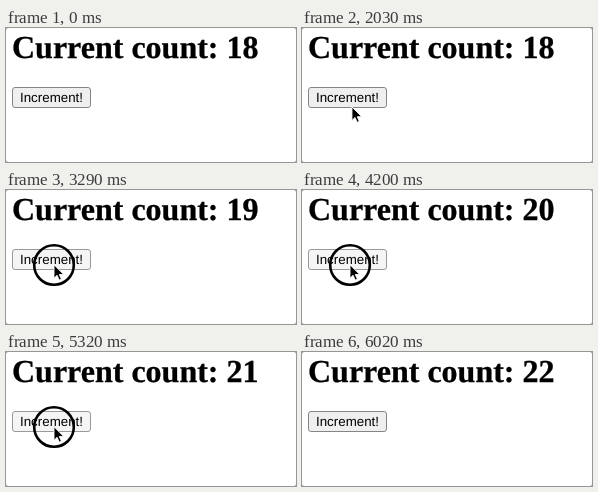
An HTML page for the animation above (6580 ms loop, 290 by 134 pixels).

```html
<!DOCTYPE html>
<html lang="en">
<head>
<meta charset="utf-8">
<title>Counter</title>
<style>
  html, body { margin: 0; width: 100%; height: 100%; overflow: hidden; background: #fff; }
  svg { display: block; width: 290px; height: 134px; }
  text { text-rendering: geometricPrecision; white-space: pre; }
  #heading {
    font: bold 32px "Liberation Serif", "Times New Roman", serif;
    stroke: #000; stroke-width: .3px;
  }
  #label { font: 13.333px "Liberation Sans", Arial, sans-serif; }
  #face { fill: #efefef; stroke: #858585; }
  .hover #face { fill: #e5e5e5; stroke: #4f4f4f; }
  .active #face { fill: #f5f5f5; stroke: #999; }
  .disabled #face { fill: #fafafa; stroke: #d1d1d1; }
  .disabled #label { fill: #b7b7b7; }
</style>
</head>
<body>
<svg viewBox="0 0 290 134">
  <rect width="290" height="134" fill="#999"/>
  <rect width="290" height="134" rx="2.5" fill="#fff"/>
  <text id="heading" x="6" y="30">Current count: 18</text>
  <g id="button">
    <rect id="face" x="6.5" y="59.5" width="78" height="20" rx="2.5"/>
    <text id="label" x="14" y="74">Increment!</text>
  </g>
  <circle id="ring" cx="48" cy="75" r="19.8" fill="none" stroke="#000" stroke-width="2.6"/>
  <path id="cursor" d="M0 0V13.6L3.1 10.6L5.2 15.4L7.4 14.5L5.3 9.8H9.7Z"
        fill="#000" stroke="#fff" stroke-width=".9" stroke-linejoin="round"/>
</svg>
<script>
const LOOP = 6580, TICK = 70;
const REST = { x: 48, y: 74.7 };
const ENTER = 1540, ARRIVE = 2170, HOVER = 2100, LEAVE = 5880;

// Each click: pressed, released, button disabled, count updated
const CLICKS = [
  [2310, 2450, 2450, 2590],
  [3290, 3430, 3430, 3570],
  [4200, 4410, 4410, 4550],
  [5320, 5460, 5530, 5600]
];

const [heading, button, ring, cursor] =
  ["heading", "button", "ring", "cursor"].map(id => document.getElementById(id));
const within = (t, from, to) => t >= from && t < to;
const show = (el, on) => el.setAttribute("visibility", on ? "visible" : "hidden");

function pointer(t) {
  if (t < ENTER || t >= LEAVE + 2 * TICK) return null;
  if (t >= LEAVE + TICK) return { x: 139.5, y: 111 };
  if (t >= LEAVE) return { x: 72, y: 85 };
  const left = 1 - Math.min(1, (t - ENTER) / (ARRIVE - ENTER));
  return { x: REST.x + 11 * left ** 1.15, y: REST.y + 54.3 * left ** 1.7 };
}

function buttonState(t) {
  for (const [press, , disable, update] of CLICKS) {
    if (within(t, press, disable)) return "active";
    if (within(t, disable, update)) return "disabled";
  }
  return within(t, HOVER, LEAVE) ? "hover" : "";
}

function render(time) {
  const t = Math.floor((time % LOOP) / TICK + 1e-6) * TICK;
  const count = 18 + CLICKS.filter(c => t >= c[3]).length;
  heading.textContent = "Current count: " + count;
  button.setAttribute("class", buttonState(t));
  show(ring, CLICKS.some(([press, release]) => within(t, press, release)));
  const p = pointer(t);
  show(cursor, p);
  if (p) cursor.setAttribute("transform", `translate(${p.x} ${p.y})`);
}

const start = performance.now();
function frame() {
  render(performance.now() - start);
  requestAnimationFrame(frame);
}
frame();
</script>
</body>
</html>
```
